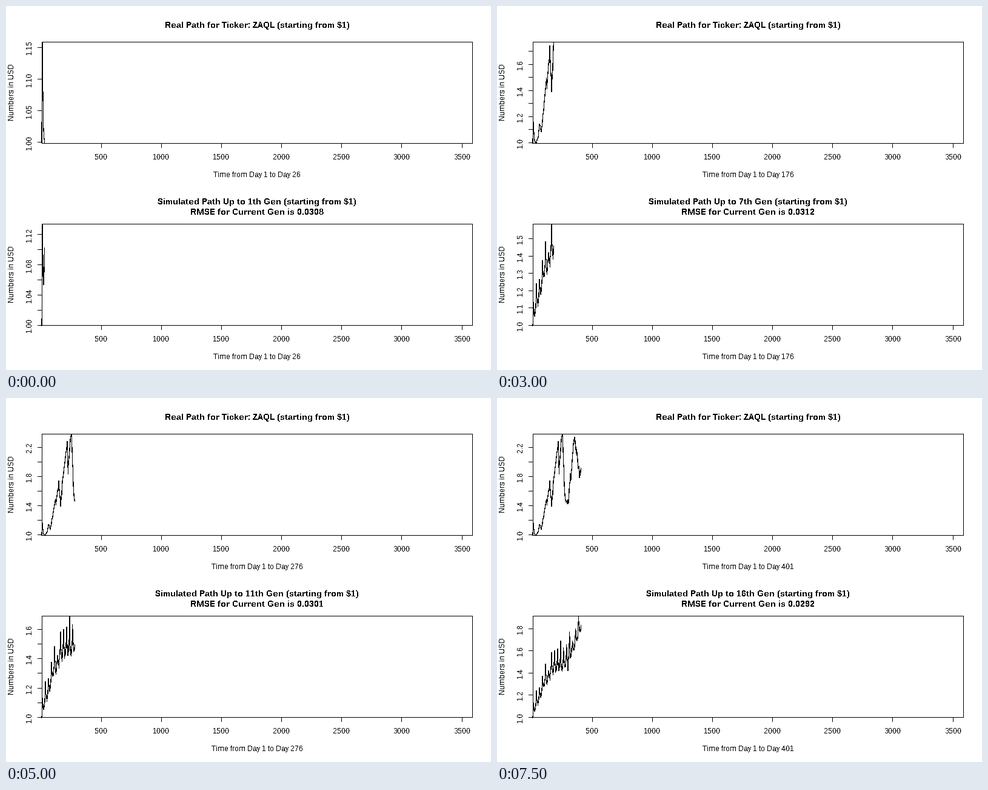
Write a matplotlib script that moves like this. It is 800 by 600 pixels and loops after 8000 ms.

```python
import math

import numpy as np
import matplotlib.pyplot as plt
from matplotlib.animation import FuncAnimation

# Crisp, pixel-hinted text without kerning
plt.rcParams.update({
    "font.family": "Liberation Sans",
    "text.hinting": "native",
    "text.hinting_factor": 1,
    "text.kerning_factor": 6,
    "text.antialiased": False,
})

FRAMES, INTERVAL, GEN_DAYS = 16, 500, 25
LEFT, RIGHT, HEIGHT = 59.5, 769.5, 167
MID = (LEFT + RIGHT) / 2
PX = 0.72  # points per pixel at 100 dpi

RMSE = [308, 338, 318, 294, 279, 286, 312, 295,
        303, 297, 301, 265, 211, 246, 283, 292]

days = np.arange(1, FRAMES * GEN_DAYS + 2)


def curve(points, x=days, **kw):
    return np.interp(x, *np.array(points).T, **kw)


def rough(seed):
    noise = np.random.default_rng(seed).normal(0, 1, days.size)
    return np.convolve(noise, [0.3, 0.6, 0.3], "same")


def within_trend(values, base):
    return np.clip(values, np.minimum.accumulate(base),
                   np.maximum.accumulate(base))


def real_path():
    turns = [(1, 1), (6, 1.1585), (14, 1.025), (28, .994), (46, 1.04),
             (57, 1.143), (72, 1.08), (115, 1.495), (118, 1.41), (143, 1.74),
             (158, 1.39), (171, 1.7), (213, 2.285), (219, 1.835),
             (236, 2.31), (247, 2.383), (267, 1.55), (275, 1.46),
             (297, 1.43), (313, 1.84), (318, 1.76), (339, 2.26),
             (354, 2.265), (394, 1.83), (401, 1.92)]
    base = curve(turns)
    noise = rough(4)
    noise[[d - 1 for d, _ in turns]] = 0
    return within_trend(base + 0.04 * noise * (base - 0.9), base)


def simulated_path():
    """One sharp wave per generation between a floor and a crest."""
    floor = curve([(1, 1), (18, 1.047), (95, 1.265), (165, 1.4),
                   (265, 1.42), (320, 1.54), (401, 1.79)])
    crest = curve([(1, 1), (7, 1.134), (32, 1.243), (57, 1.266),
                   (107, 1.484), (132, 1.42), (157, 1.585), (207, 1.6185),
                   (232, 1.691), (270, 1.6), (307, 1.77), (332, 1.69),
                   (382, 1.915)])
    wave = curve([(0, 1), (4, 0.4), (11, 0), (15, 0.15), (18, 0.1)],
                 days - 7, period=GEN_DAYS)
    span = crest - floor
    base = floor + span * wave
    return within_trend(base + 0.16 * rough(9) * span * (1 - wave), base)


def pretty(lo, hi):
    cell = (hi - lo) / 5
    base = 10 ** math.floor(math.log10(cell))
    step = base
    for mult, bias in ((2, 0.8), (5, 1.7), (10, 0.8)):
        if mult * base - cell < bias * (cell - step):
            step = mult * base
    first = math.ceil(lo / step - 1e-6)
    last = math.floor(hi / step + 1e-6)
    return step, [i * step for i in range(first, last + 1)]


fig = plt.figure(figsize=(8, 6), dpi=100, facecolor="white")
ax = fig.add_axes([0, 0, 1, 1])


def text(x, y, s, size=12, **kw):
    ax.text(x, y, s, fontsize=size * PX, ha="center", va="baseline",
            rotation_mode="anchor", parse_math=False, **kw)


def line(xs, ys):
    """One-pixel line through pixel centres."""
    ax.plot(np.floor(xs) + 0.5, np.floor(ys) + 0.5, color="black", lw=PX,
            antialiased=False, snap=False, solid_joinstyle="miter",
            solid_capstyle="projecting")


def panel(top, titles, series, day):
    bottom = top + HEIGHT
    line([LEFT, RIGHT, RIGHT, LEFT, LEFT], [top, top, bottom, bottom, top])

    for i, s in enumerate(reversed(titles)):
        text(MID, top - 23.5 + 8 * (len(titles) - 1) - 17 * i, s, 14,
             weight="bold")
    text(MID, bottom + 55.5, f"Time from Day 1 to Day {day}")
    text(13, top + 82.5, "Numbers in USD", rotation=90)

    for t in range(500, 3501, 500):
        x = 57.8 + 0.1984 * t
        line([x, x], [bottom, bottom + 7])
        text(x, bottom + 26.5, t)

    shown = series[:day]
    lo, hi = shown.min(), shown.max()
    scale = HEIGHT / (hi - lo)
    step, ticks = pretty(lo, hi)
    digits = 2 if step < 0.099 else 1
    room = 35 if digits == 2 else 28.5
    free = math.inf
    for t in ticks:
        y = bottom - (t - lo) * scale
        line([LEFT - 7, LEFT], [y, y])
        if y <= free:
            text(42, y, f"{t:.{digits}f}", rotation=90)
            free = y - room

    line(58.8 + 0.1984 * days[:day], bottom - (shown - lo) * scale)


real, simulated = real_path(), simulated_path()


def draw(k):
    ax.clear()
    ax.axis("off")
    ax.set(xlim=(0, 800), ylim=(600, 0))
    gen = k + 1
    day = 1 + GEN_DAYS * gen
    panel(59.5, ["Real Path for Ticker: ZAQL (starting from $1)"], real, day)
    panel(359.5, [f"Simulated Path Up to {gen}th Gen (starting from $1)",
                  f"RMSE for Current Gen is {RMSE[k] / 1e4:.4f}"],
          simulated, day)
    return []


anim = FuncAnimation(fig, draw, frames=FRAMES, init_func=lambda: [],
                     interval=INTERVAL, repeat=True, repeat_delay=0)
plt.show()
```
